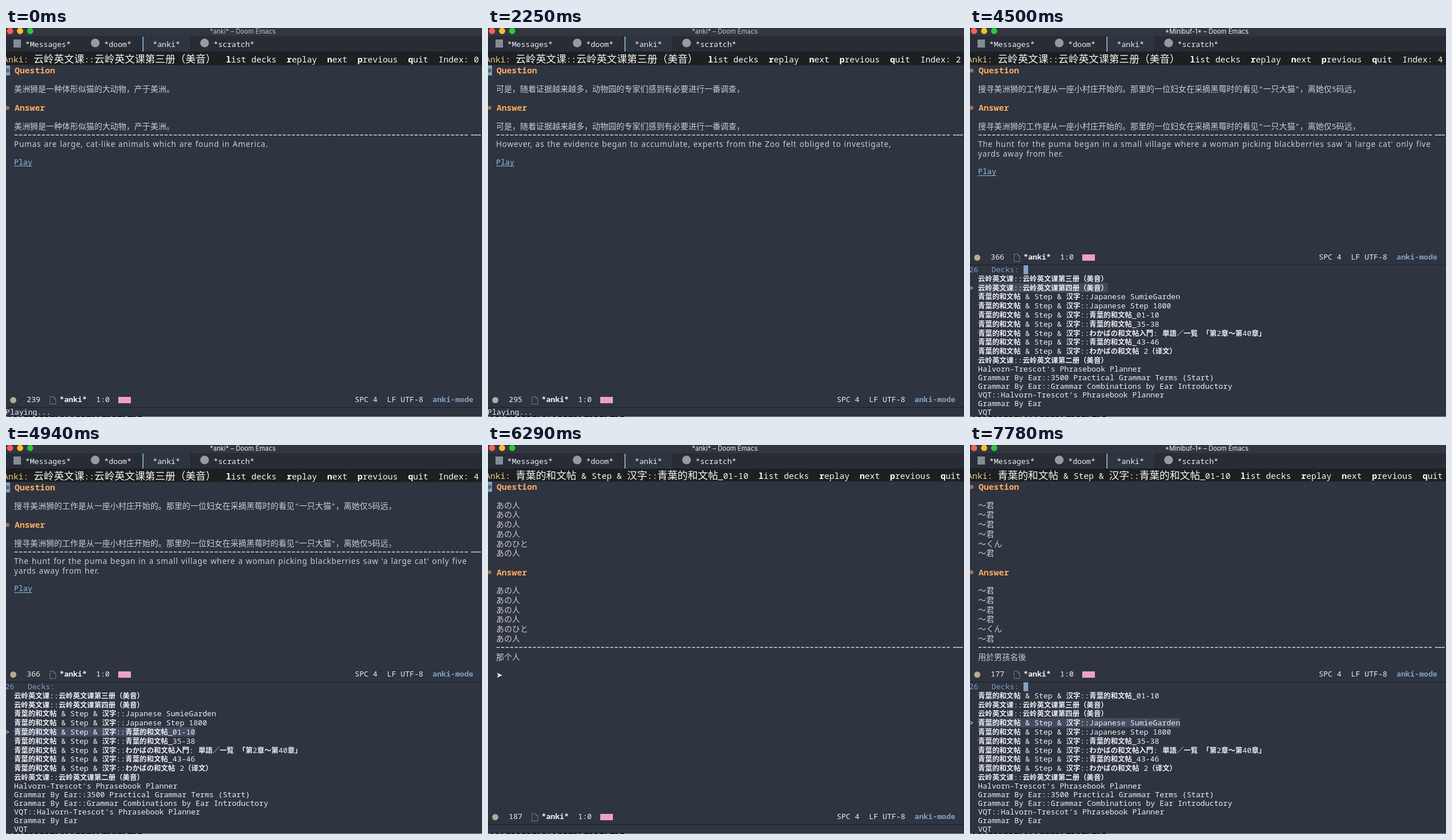
An HTML page with a canvas for the animation above (8000 ms loop, 827 by 677 pixels).

```html
<!DOCTYPE html>
<html lang="en">
<head>
<meta charset="utf-8">
<title>Flash cards in an editor</title>
<style>
html, body { margin: 0; width: 100%; height: 100%; overflow: hidden; background: #2e3440; }
canvas { display: block; }
</style>
</head>
<body>
<canvas id="stage" width="827" height="677"></canvas>
<script>
const ctx = document.getElementById('stage').getContext('2d');
const W = 827, H = 677, LOOP = 8000;

const BG = '#2e3440', BAR = '#272c36', DARK = '#1d1f21', BLUE = '#81a1c1';
const WHITE = '#eceff4', GREY = '#cccdcf', ORANGE = '#fdab63', TAN = '#b5ab90', GREEN = '#a3be8c';

const MONO = '"Noto Sans Mono", "DejaVu Sans Mono", monospace';
const SANS = '"Noto Sans", "DejaVu Sans", sans-serif';
const CJK = '"Noto Sans CJK SC", "Noto Sans CJK JP", sans-serif';

// Text styles: Latin size and family, CJK size, weights, optional spacing
const UI = { size: 13.15, family: MONO, weight: 500, cjk: 12.35, cjkWeight: 700 };
const HEAD = { size: 14.65, family: MONO, weight: 500, cjk: 17.6, cjkWeight: 500 };
const CARD = { size: 13.15, family: MONO, weight: 500, cjk: 13.93, cjkWeight: 500 };
const PROSE = { size: 13.5, family: SANS, weight: 400, cjk: 13.93, cjkWeight: 500, letter: 0.75, word: 0.75 };

const isCjk = /[\u2e80-\u9fff\uff00-\uffef]/;
const runs = /[\u2e80-\u9fff\uff00-\uffef]+|[^\u2e80-\u9fff\uff00-\uffef]+/g;

// Draws mixed text and returns the x where it ends
function put(text, x, y, style, color, weight = style.weight, paint = true) {
  ctx.textAlign = 'left';
  for (const run of text.match(runs) || []) {
    const wide = isCjk.test(run);
    ctx.font = wide ? `${style.cjkWeight} ${style.cjk}px ${CJK}` : `${weight} ${style.size}px ${style.family}`;
    ctx.letterSpacing = (wide ? 0 : style.letter || 0) + 'px';
    ctx.wordSpacing = (wide ? 0 : style.word || 0) + 'px';
    ctx.fillStyle = color;
    if (paint) ctx.fillText(run, x, y);
    x += ctx.measureText(run).width;
  }
  ctx.letterSpacing = ctx.wordSpacing = '0px';
  return x;
}

function rect(x, y, w, h, color) {
  ctx.fillStyle = color;
  ctx.fillRect(x, y, w, h);
}

function disc(x, y, r, color) {
  ctx.fillStyle = color;
  ctx.beginPath();
  ctx.arc(x, y, r, 0, 7);
  ctx.fill();
}

// Deck names
const THIRD = '云岭英文课::云岭英文课第三册（美音）';
const FOURTH = '云岭英文课::云岭英文课第四册（美音）';
const GROUP = '青葉的和文帖 & Step & 汉字::';
const FIRST_TEN = GROUP + '青葉的和文帖_01-10';
const GARDEN = [GROUP + 'Japanese SumieGarden', GROUP + 'Japanese Step 1800'];
const REST = [
  GROUP + '青葉的和文帖_35-38',
  GROUP + 'わかばの和文帖入門: 単語／一覧 「第2章～第40章」',
  GROUP + '青葉的和文帖_43-46',
  GROUP + 'わかばの和文帖 2（译文）',
  '云岭英文课::云岭英文课第二册（美音）',
  "Halvorn-Trescot's Phrasebook Planner",
  'Grammar By Ear::3500 Practical Grammar Terms (Start)',
  'Grammar By Ear::Grammar Combinations by Ear Introductory',
  "VQT::Halvorn-Trescot's Phrasebook Planner",
  'Grammar By Ear',
  'VQT'
];
const LIST_A = [THIRD, FOURTH, ...GARDEN, FIRST_TEN, ...REST];
const LIST_B = [FIRST_TEN, THIRD, FOURTH, ...GARDEN, ...REST];

function sentence(index, zh, ...en) {
  const size = 2 * zh.length + en.join(' ').length + 138;
  return { deck: THIRD, index, lines: [zh], en, size, shift: 0 };
}

function word(kanji, kana, count, size, notes, dot = TAN) {
  const lines = Array(count).fill(kanji);
  lines[count - 2] = kana;
  return { deck: FIRST_TEN, index: 0, lines, notes, size, dot, shift: -1 };
}

const SENTENCES = [
  sentence(0, '美洲狮是一种体形似猫的大动物，产于美洲。',
    'Pumas are large, cat-like animals which are found in America.'),
  sentence(1, '当动物园接到报告说，在城南45英里处发现一只美洲狮时，这些报告并没有受到重视。',
    'When reports came into the Zoo that a wild puma had been spotted forty-five miles south of the town,',
    'they were not taken seriously.'),
  sentence(2, '可是，随着证据越来越多，动物园的专家们感到有必要进行一番调查，',
    'However, as the evidence began to accumulate, experts from the Zoo felt obliged to investigate,'),
  sentence(3, '因为凡是声称见到过美洲狮的人们所描述的情况竟是出奇地相似。',
    'for the descriptions given by people who claimed to have seen the puma were extraordinarily similar.'),
  sentence(4, '搜寻美洲狮的工作是从一座小村庄开始的。那里的一位妇女在采摘黑莓时的看见“一只大猫”，离她仅5码远，',
    "The hunt for the puma began in a small village where a woman picking blackberries saw 'a large cat' only five",
    'yards away from her.')
];

const WORDS = [
  word('私', 'わたし', 6, 180, ['我 我们的朋友', '➤ 我们的朋友', '我们的朋友']),
  word('私たち', 'わたしたち', 7, 196, ['我们', '➤']),
  word('あなた', 'あなた', 5, 178, ['你', '➤']),
  word('あの人', 'あのひと', 6, 187, ['那个人', '➤']),
  word('あの方', 'あのかた', 6, 190, ['那位', '➤']),
  word('皆さん', 'みなさん', 5, 184, ['大家，各位', '➤']),
  word('～君', '～くん', 6, 177, ['用於男孩名後', '➤'], GREEN)
];

// Timeline: start, card, and the open deck list with its selected row
const [s0, s1, s2, s3, s4] = SENTENCES;
const STEPS = [
  [0, s0], [1050, s1], [2250, s2], [3000, s3], [3600, s4],
  [3900, s4, LIST_A, 0], [4500, s4, LIST_A, 1], [4650, s4, LIST_A, 2],
  [4800, s4, LIST_A, 3], [4940, s4, LIST_A, 4],
  ...[5390, 5990, 6140, 6290, 6440, 6590, 6890].map((t, i) => [t, WORDS[i]]),
  ...[7040, 7480, 7630, 7780].map((t, i) => [t, WORDS[6], LIST_B, i])
];

function drawTitle(text, bright) {
  rect(0, 0, W, 14, '#32363f');
  ['#fe5f57', '#febc2e', '#28c840'].forEach((c, i) => disc(7 + 17.5 * i, 5.2, 5.4, c));
  ctx.font = '400 11.2px Inter, sans-serif';
  ctx.textAlign = 'center';
  ctx.fillStyle = bright ? '#f2f3f5' : '#c3c6cb';
  ctx.fillText(text + ' – Doom Emacs', 411.5, 9.6);
}

function drawTabs() {
  rect(0, 14, W, 27, BAR);
  rect(238, 14, 82, 27, BG);
  rect(237, 15, 2, 26, BLUE);
  rect(13, 20, 13, 14, '#858b94');
  disc(155, 26, 7.6, '#959aa3');
  disc(345, 26, 7.6, '#959aa3');
  put('*Messages*', 33.5, 32.5, UI, WHITE);
  put('*doom*', 170.5, 32.5, UI, WHITE);
  put('*anki*', 255, 32.5, UI, WHITE);
  put('*scratch*', 360.5, 32.5, UI, WHITE);
}

function drawHeader(card) {
  const y = 59.5 + card.shift;
  rect(0, 41, W, 23.5 + card.shift, DARK);
  put('Anki: ', -4.8, y, HEAD, '#ebcb8b');
  let x = put(card.deck + '  ', 48, y, HEAD, '#f4f5f7');
  for (const key of ['list decks', 'replay', 'next', 'previous', 'quit']) {
    x = put(key[0], x, y, HEAD, '#ffffff', 700);
    x = put(key.slice(1) + '  ', x, y, HEAD, '#f4f5f7');
  }
  put('Index: ' + card.index, x, y, HEAD, '#f4f5f7');
}

function drawHeading(text, y, cursor) {
  if (cursor) rect(0, y - 9, 7, 17.5, BLUE);
  const color = cursor ? BG : ORANGE;
  ctx.strokeStyle = color;
  ctx.lineWidth = 1;
  ctx.beginPath();
  ctx.arc(2.6, y, 2.8, 0, 7);
  ctx.stroke();
  disc(2.6, y, 1.2, color);
  put(text, 15, y + 5, HEAD, ORANGE, 700);
}

function drawRule(y) {
  for (let i = 0; i < 100; i++) rect(14.8 + 7.9 * i, y - 0.7, 5.4, 1.4, '#dfe0e2');
  for (let i = 0; i < 3; i++) rect(808 + 5.8 * i, y - 0.7, 5.3, 1.4, '#dfe0e2');
}

function drawLines(lines, y) {
  lines.forEach((line, i) => put(line, 14, y + 16.7 * i + 5.2, CARD, GREY));
  return y + 16.7 * (lines.length - 1);
}

function drawCard(card, cursor) {
  let y = 74 + card.shift;
  drawHeading('Question', y, cursor);
  y = drawLines(card.lines, y + 31.5) + 33.5;
  drawHeading('Answer', y, false);
  y = drawLines(card.lines, y + 31.5) + 15.8;
  drawRule(y);
  y += 16.3;
  if (card.en) {
    card.en.forEach((line, i) => put(line, 14, y + 16.7 * i + 4.7, PROSE, GREY));
    y += 16.7 * (card.en.length - 1) + 30.3;
    const end = put('Play', 14, y + 4.8, UI, '#88c5e6');
    rect(14, y + 6.8, end - 14, 1, '#88c5e6');
    return;
  }
  card.notes.forEach((note, i) => {
    const ny = y + 31.7 * i + 5;
    if (note[0] !== '➤') return put(note, 14, ny, PROSE, GREY);
    put('➤', 14, ny, PROSE, '#f4f5f7');
    put(note.slice(2), 31, ny, PROSE, GREY);
  });
}

function drawModeline(card, y) {
  rect(0, y - 11, W, H - y + 11, BG);
  const base = y + 4.3;
  disc(12.6, y + 0.6, 5.4, card.dot && y > 600 ? card.dot : TAN);
  put(String(card.size), 36, base, UI, WHITE);
  ctx.strokeStyle = '#737983';
  ctx.lineWidth = 1;
  ctx.beginPath();
  ctx.moveTo(83, y - 5.5);
  ctx.lineTo(76.5, y - 5.5);
  ctx.lineTo(76.5, y + 7.5);
  ctx.lineTo(86.5, y + 7.5);
  ctx.lineTo(86.5, y - 2);
  ctx.lineTo(83, y - 5.5);
  ctx.lineTo(83, y - 2);
  ctx.lineTo(86.5, y - 2);
  ctx.stroke();
  put('*anki*', 93, base, UI, '#f4f5f7', 700);
  put('1:0', 156.5, base, UI, WHITE);
  rect(195, y - 5, 22, 11, '#ee9fce');
  put('SPC 4', 606, base, UI, WHITE);
  put('LF', 662, base, UI, WHITE);
  put('UTF-8', 685.5, base, UI, WHITE);
  put('anki-mode', 741, base, UI, BLUE, 700);
  rect(0, y + 13, W, 1, '#1b1f27');
}

function drawList(list, pick, focus) {
  put('26', -1.5, 425, UI, BLUE);
  put('Decks:', 37.5, 425, UI, BLUE);
  if (focus) rect(93, 413, 8, 15.5, BLUE);
  list.forEach((name, i) => {
    const y = i < 10 ? 436 + 15.8 * i : 593.3 + 15 * (i - 10);
    if (i === pick) {
      const end = put(name, 14, y, UI, WHITE, UI.weight, false);
      rect(14, y - 8, end - 14, 16, '#434c5e');
      put('>', -1.5, y + 4.7, UI, WHITE);
    }
    put(name, 14, y + 4.7, UI, WHITE);
  });
}

// Window border with the tops of a dark text line below it
function drawEdge() {
  rect(0, 676, W, 1, '#918f98');
  for (let i = 0; i < 26; i++) {
    const r = Math.abs(Math.sin(i * 12.9) * 43.7) % 1;
    rect(5 + 9 * i, 675.3, 3 + 5 * r, 1.7, '#14161a');
  }
}

function draw(t) {
  const [, card, list, pick] = STEPS.findLast(step => step[0] <= t);
  const waiting = t >= 4940 && t < 5390;
  const focus = !!list && !waiting;
  const bright = (t >= 3900 && t < 6440) || t >= 7040;

  rect(0, 0, W, H, BG);
  drawCard(card, !focus);
  drawTitle(focus ? '*Minibuf-1*' : '*anki*', bright);
  drawTabs();
  drawHeader(card);
  drawModeline(card, list ? 399 : 647);
  if (list) drawList(list, pick, focus);
  else if (card.en) put('Playing...', -1, 672.5, UI, WHITE);
  drawEdge();
}

function tick() {
  draw(performance.now() % LOOP);
  requestAnimationFrame(tick);
}
tick();
</script>
</body>
</html>
```
